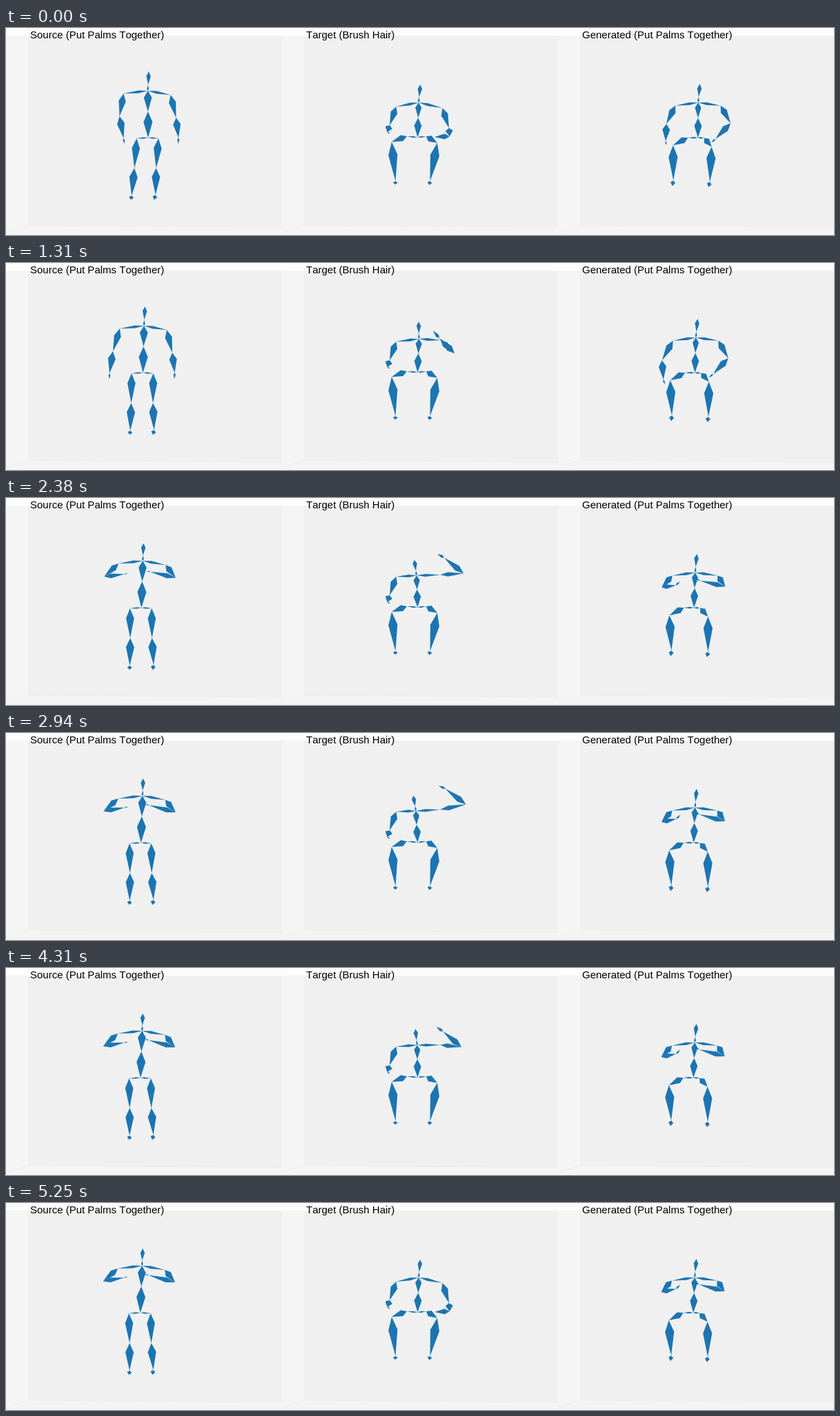
Write an HTML page with a canvas that moves like this. It is 1200 px wide and 300 px high and loops after 5.31 s.

```html
<!DOCTYPE html>
<html lang="en">
<head>
<meta charset="utf-8">
<title>Motion retargeting</title>
<style>
html, body { margin: 0; width: 100%; height: 100%; overflow: hidden; background: #fdfdfd; }
canvas { display: block; }
</style>
</head>
<body>
<canvas id="stage" width="1200" height="300"></canvas>
<script>
const ctx = document.getElementById('stage').getContext('2d');
const LOOP = 5310, STEP = 62.5, LAST = 84;

const clamp = v => Math.min(1, Math.max(0, v));
const ramp = (t, from, to) => clamp((t - from) / (to - from));
const smooth = k => k * k * (3 - 2 * k);
const mix = (a, b, k) => a.map((v, i) => v + (b[i] - v) * k);

// Progress through the key poses at a given step.
const pray = t => ramp(t, 0, 21) + smooth(ramp(t, 24, 40));
const brush = t => ramp(t, 13, 21) - ramp(t, 74, 84) + Math.sin(Math.PI * ramp(t, 21, 81));

const standing = { back: 5.8, waist: 6.5, thigh: 5.8, shin: 6 };
const seated = { back: 4.5, waist: 5.4, thigh: 4.7, shin: 6.6 };

// Each pose after the first lists only the joints that move.
const figures = [{
  title: 'Source (Put Palms Together)', x: 0, progress: pray, drift: 1, width: standing,
  legs: {
    pelvis: [194.5, 159],
    hipL: [178, 160], kneeL: [179, 203], ankleL: [179, 243], footL: [178.5, 249],
    hipR: [209.5, 160], kneeR: [210.5, 203], ankleR: [213.5, 242], footR: [212, 249]
  },
  poses: [{
    head: [198.5, 63], chest: [197, 91], shoulderL: [162, 95], shoulderR: [230, 97],
    elbowL: [156, 128], wristL: [162, 160], handL: [163, 168],
    elbowR: [238, 130], wristR: [241.5, 159], handR: [241, 168]
  }, {
    elbowL: [152, 128], wristL: [147, 160], handL: [147, 168]
  }, {
    head: [198, 66], elbowL: [140.5, 113.5], wristL: [171.5, 108], handL: [176, 107],
    elbowR: [245, 115], wristR: [206, 104.5], handR: [201.5, 103.5]
  }]
}, {
  title: 'Target (Brush Hair)', x: 400, progress: brush, drift: 0, width: seated,
  legs: {
    pelvis: [596.5, 158.5],
    hipL: [581, 157], kneeL: [559, 165], ankleL: [564.5, 222], footL: [564, 227],
    hipR: [609, 157], kneeR: [625, 166.5], ankleR: [614.5, 222], footR: [613.5, 227.5]
  },
  poses: [{
    head: [600.5, 82], chest: [598, 108], shoulderL: [565.5, 114], shoulderR: [632.5, 116],
    elbowL: [556, 141], wristL: [552.5, 151], handL: [557, 153],
    elbowR: [642, 145], wristR: [643, 157], handR: [621, 158]
  }, {
    head: [598, 85], chest: [598.5, 110], shoulderR: [630, 112],
    elbowR: [650, 131], wristR: [628, 109], handR: [619, 98]
  }, {
    head: [590, 91], chest: [594, 113], shoulderR: [629, 111],
    elbowR: [667, 103], wristR: [637, 80], handR: [627, 76]
  }]
}, {
  title: 'Generated (Put Palms Together)', x: 800, progress: pray, drift: .6, width: seated,
  legs: {
    pelvis: [996, 159],
    hipL: [981.5, 159], kneeL: [960.5, 170], ankleL: [964, 221], footL: [963, 229],
    hipR: [1005, 159.5], kneeR: [1016.5, 172], ankleR: [1017, 223], footR: [1015.5, 230.5]
  },
  poses: [{
    head: [1000.5, 81], chest: [998, 108], shoulderL: [965, 112.5], shoulderR: [1030.5, 112.5],
    elbowL: [952, 139], wristL: [951, 164], handL: [952, 170],
    elbowR: [1045, 138], wristR: [1023, 161], handR: [1017, 166]
  }, {
    elbowL: [949, 141], wristL: [951, 169], handL: [953, 176]
  }, {
    elbowL: [949.5, 129], wristL: [971, 124.5], handL: [977, 118.5],
    elbowR: [1041.5, 128], wristR: [1004, 118], handR: [999, 115]
  }]
}];

function polygon(color, ...pts) {
  ctx.fillStyle = color;
  ctx.beginPath();
  pts.forEach(p => ctx.lineTo(...p));
  ctx.fill();
}

// Diamond from a to b, widest at the fraction k; lean widens it when upright.
function bone(a, b, half, k = .33, lean = 0) {
  const dx = b[0] - a[0], dy = b[1] - a[1], len = Math.hypot(dx, dy) || 1;
  const w = (half + lean * Math.abs(dy) / len) / len;
  const [x, y] = mix(a, b, k);
  polygon('#1c75b2', a, [x - dy * w, y + dx * w], b, [x + dy * w, y - dx * w]);
}

function room(x) {
  polygon('#f5f5f5', [x, 11], [x + 32, 11], [x + 32, 286], [x, 296]);
  polygon('#f0f0f0', [x + 32, 11], [x + 400, 11], [x + 400, 289], [x + 32, 286]);
  polygon('#f4f4f4', [x, 296], [x + 32, 286], [x + 400, 289], [x + 400, 300], [x, 300]);
  ctx.strokeStyle = '#ececec';
  ctx.beginPath();
  [[x, 296], [x + 32, 286], [x + 400, 289]].forEach(p => ctx.lineTo(...p));
  ctx.stroke();
}

function joints({ legs, poses, progress, drift }, step) {
  const p = progress(step), i = Math.min(1, Math.floor(p));
  const from = { ...poses[0], ...(i && poses[1]) };
  const to = { ...from, ...poses[i + 1] };
  // The body starts off to the right and settles; the feet move least.
  const shift = drift * Math.exp(-step / 20), out = {};
  for (const name in from) {
    const [x, y] = mix(from[name], to[name], p - i);
    out[name] = [x + 8.5 * shift, y];
  }
  for (const name in legs) {
    const [x, y] = legs[name];
    out[name] = [x + (2.5 + (249 - y) / 10) * shift, y];
  }
  return out;
}

function drawFigure(figure, step) {
  const { title, x, width } = figure;
  const j = joints(figure, step);
  const neck = mix(j.chest, j.head, .31), waist = mix(j.chest, j.pelvis, .44);
  room(x);
  bone(j.chest, neck, 1.4);
  bone(neck, j.head, 3.2, .65);
  bone(j.chest, waist, width.back);
  bone(waist, j.pelvis, width.waist, .4);
  for (const side of ['L', 'R']) {
    const at = name => j[name + side];
    const wrist = at('wrist'), hand = at('hand');
    bone(j.chest, at('shoulder'), 2, .38);
    bone(at('shoulder'), at('elbow'), 3, .33, 2.2);
    bone(at('elbow'), wrist, 3, .33, 2.5);
    bone(wrist, hand, Math.hypot(hand[0] - wrist[0], hand[1] - wrist[1]) * .18);
    bone(j.pelvis, at('hip'), 1.2, .4);
    bone(at('hip'), at('knee'), width.thigh);
    bone(at('knee'), at('ankle'), width.shin);
    bone(at('ankle'), at('foot'), 3.5, .4);
  }
  ctx.fillStyle = '#000';
  ctx.fillText(title, x + 35, 15);
}

function draw(now) {
  const step = Math.min(LAST, Math.floor((now % LOOP + 5) / STEP));
  ctx.fillStyle = '#fdfdfd';
  ctx.fillRect(0, 0, 1200, 300);
  ctx.font = '15px "Liberation Sans", Arial, sans-serif';
  ctx.fontKerning = 'none';
  figures.forEach(f => drawFigure(f, step));
}

const start = performance.now();
(function tick() {
  draw(performance.now() - start);
  requestAnimationFrame(tick);
})();
</script>
</body>
</html>
```
